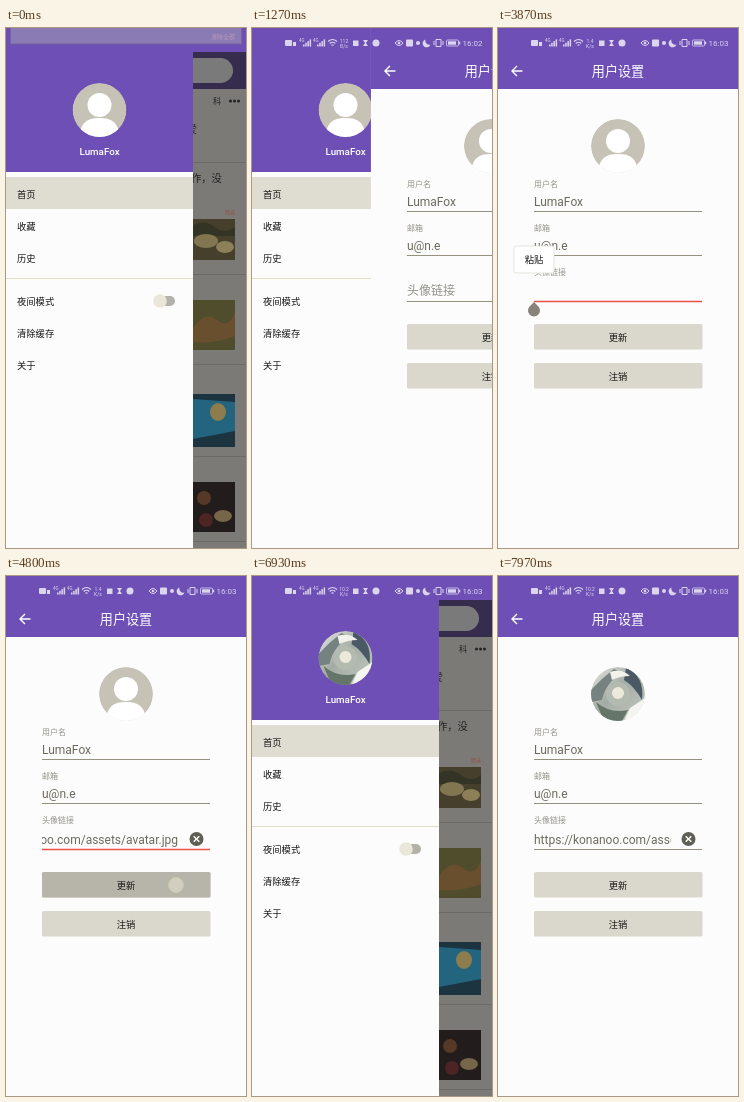
Write an HTML page that moves like this. It is 240 px wide and 520 px high and loops after 8000 ms.

```html
<!DOCTYPE html>
<html lang="zh-CN">
<head>
<meta charset="utf-8">
<style>
  html, body { margin: 0; width: 100%; height: 100%; overflow: hidden; background: #fcfcfd }
  svg { display: block; width: 240px; height: 520px }
  text { font-family: Roboto, "Noto Sans CJK SC", "Noto Sans CJK", sans-serif; dominant-baseline: central }
  .item { font-size: 9.3px; font-weight: 500; fill: #161616 }
  .label { font-size: 8px; fill: #949289 }
  .value { font-size: 12px; fill: #6c6a5e }
  .mid { text-anchor: middle }
  .bar { fill: #6e4fb5 }
  .button { fill: #dad8cc }
</style>
</head>
<body>
<svg viewBox="0 0 240 520">
  <defs>
    <clipPath id="disc"><circle r="27"/></clipPath>
    <clipPath id="field"><rect x="36" y="252" width="137" height="21"/></clipPath>
    <linearGradient id="stone" x2="1" y2="1">
      <stop offset="0" stop-color="#e6e8e4"/><stop offset=".45" stop-color="#a3aca4"/><stop offset="1" stop-color="#c3c9c0"/>
    </linearGradient>
    <g id="person" clip-path="url(#disc)">
      <circle r="27" fill="#c6c2b6"/>
      <circle cy="-5" r="12" fill="#fff"/>
      <path d="M-20 27C-19 12-12 8 0 8S19 12 20 27Z" fill="#fff"/>
    </g>
    <g id="photo" clip-path="url(#disc)">
      <circle r="27" fill="url(#stone)"/>
      <path d="M-27-4Q-16-16-4-25L4-21Q-12-12-16 6L-27 8Z" fill="#76827f"/>
      <path d="M8-26Q27-18 24 6Q16-8 6-14Z" fill="#4b5866"/>
      <path d="M-22 8Q-8 20 10 16L4 27H-14Z" fill="#66756a"/>
      <path d="M12 14L27 4V27H6Z" fill="#f4f4f0"/>
      <path d="M-8-22Q4-26 12-18Q2-18-6-14Z" fill="#f1f2ec"/>
      <circle r="12" fill="#b3bab0"/>
      <circle cy="-1" r="6" fill="#ece9da"/>
    </g>
  </defs>

  <!-- dimmed home page -->
  <rect width="240" height="520" fill="#7b7a76"/>
  <rect y="24" width="240" height="37" fill="#362d4e"/>
  <rect x="60" y="30" width="167" height="25" rx="12.5" fill="#7b7a7a"/>
  <g fill="#222">
    <text x="207" y="73" font-size="8">科</text>
    <circle cx="224.500" cy="73" r="1.500"/><circle cx="228.500" cy="73" r="1.500"/><circle cx="232.500" cy="73" r="1.500"/>
    <text x="181" y="101" font-size="10">爱</text>
    <text x="185" y="150" font-size="10.300">作，没</text>
  </g>
  <path d="M187 134.500H240M187 246.500H240M187 336.500H240M187 428.500H240M187 513.500H240" stroke="#6b6a66"/>
  <text x="219" y="184" font-size="5" fill="#94504a">精选</text>
  <g>
    <rect x="180" y="191" width="49" height="41" fill="#463f2b"/>
    <path d="M187 197q12-6 22 2t20 0v9h-42z" fill="#333426"/>
    <ellipse cx="200" cy="213" rx="12" ry="7" fill="#827651"/><ellipse cx="219" cy="219" rx="9" ry="6" fill="#8d8058"/>
    <rect x="180" y="272" width="49" height="50" fill="#4f4d2c"/>
    <path d="M187 300q12-18 24-8t18-8v24q-20 8-42 6z" fill="#6a4f2e"/>
    <rect x="180" y="366" width="49" height="53" fill="#1c3440"/>
    <path d="M187 371L229 374V403L187 411Z" fill="#23657f"/>
    <ellipse cx="212" cy="384" rx="8" ry="9" fill="#8d7c4e"/>
    <rect x="180" y="454" width="49" height="50" fill="#231c1c"/>
    <circle cx="198" cy="470" r="7" fill="#553827"/><ellipse cx="217" cy="488" rx="9" ry="6" fill="#75664a"/><circle cx="200" cy="492" r="7" fill="#4b2423"/>
  </g>

  <!-- drawer -->
  <rect width="187" height="520" fill="#fcfcfd"/>
  <rect class="bar" width="240" height="24"/>
  <rect class="bar" width="187" height="144"/>
  <use id="face" x="93.500" y="82"/>
  <g id="spinner"></g>
  <text class="mid user" x="93.500" y="123" font-size="9.800" font-weight="500" fill="#fff"></text>
  <rect y="149" width="187" height="32" fill="#dfddd2"/>
  <g id="menu"></g>
  <path d="M0 250.500H187" stroke="#e0dec4"/>
  <rect x="150" y="268" width="19" height="10" rx="5" fill="#b3b1aa"/>
  <circle cx="154" cy="273" r="6.800" fill="#ebe7d8"/>

  <!-- settings page -->
  <g id="page">
    <rect width="240" height="520" fill="#fcfcfd"/>
    <rect class="bar" width="240" height="61"/>
    <path d="M24.500 43H14M19 38L14 43L19 48" fill="none" stroke="#fff" stroke-width="1.400"/>
    <text class="mid" x="120" y="43" font-size="13.100" font-weight="500" fill="#fff">用户设置</text>
    <use id="portrait" x="120" y="118"/>
    <text class="label" x="36" y="156">用户名</text>
    <text class="value user" x="36" y="174"></text>
    <text class="label" x="36" y="200">邮箱</text>
    <text class="value" x="36" y="218">u@n.e</text>
    <path d="M36 183.500H204M36 227.500H204" stroke="#94927f"/>
    <path id="line" d="M36 273.500H204"/>
    <text id="hint" font-size="12" fill="#949289">头像链接</text>
    <g id="filled">
      <g clip-path="url(#field)"><text id="url" class="value" y="263.500">https://konanoo.com/assets/avatar.jpg</text></g>
      <circle cx="190.500" cy="263" r="7" fill="#605f55"/>
      <path d="M187.700 260.200l5.600 5.600m0-5.600l-5.600 5.600" stroke="#fff" stroke-width="1.400"/>
    </g>
    <rect class="button" x="36" y="296" width="168.500" height="25.500" rx="1.500"/>
    <rect id="pressed" x="36" y="296" width="168.500" height="25.500" rx="1.500" fill="#b7b5aa"/>
    <rect class="button" x="36" y="335" width="168.500" height="25.500" rx="1.500"/>
    <text class="item mid" x="120" y="309">更新</text>
    <text class="item mid" x="120" y="348">注销</text>
    <g id="paste">
      <path d="M36 274l4.500 4.500a6 6 0 1 1-9 0z" fill="#86847a"/>
      <rect x="16" y="218" width="40" height="27" rx="2" fill="#fff" stroke="#dddcd6" stroke-width=".8"/>
      <text class="item mid" x="36" y="231.500">粘贴</text>
    </g>
  </g>

  <circle id="touch" r="7.500" fill="#fbf7e6" fill-opacity=".4" stroke="#cfc9ae" stroke-width=".8"/>

  <!-- status bar -->
  <g id="status" fill="#fff">
    <rect x="33" y="12" width="7" height="6" rx="1"/><rect x="41" y="14" width="3" height="4"/>
    <g id="signals"></g>
    <path d="M76 13.500q4.500-4 9 0M77.700 15.500q2.800-2.500 5.600 0M79.500 17.300q1-.9 2 0" fill="none" stroke="#fff" stroke-width="1.100"/>
    <g class="mid" font-size="5"><text id="speed" x="92" y="12.500"></text><text id="unit" x="92" y="18"></text></g>
    <rect x="101" y="12.500" width="5.500" height="5.500"/>
    <path d="M111 12h5l-2 3 2 3h-5l2-3z"/>
    <circle cx="124" cy="15" r="3.500"/>
    <path d="M143 15q4-5 8 0q-4 5-8 0z" fill="none" stroke="#fff"/><circle cx="147" cy="15" r="1.300"/>
    <rect x="154" y="11.500" width="7" height="7" rx="1"/>
    <circle cx="166" cy="15" r="2"/>
    <path d="M173.500 11.500a4 4 0 1 0 5 5a4 4 0 0 1-5-5z"/>
    <path d="M184 11.500h5v7h-5zM182 13v4M191 13v4" fill="none" stroke="#fff"/>
    <rect x="194.500" y="12" width="12" height="6" rx="1" fill="none" stroke="#fff" stroke-width=".8"/>
    <rect x="196" y="13.300" width="8" height="3.400"/><rect x="207" y="13.700" width="1.200" height="2.600"/>
    <text id="clock" x="210.500" y="15" font-size="8"></text>
  </g>
  <g id="shade">
    <rect x="4.500" y="-2" width="231" height="18" fill="#8b7bb4" stroke="#75649f"/>
    <text x="205" y="8" font-size="6" fill="#b79cb4">清除全部</text>
  </g>
</svg>
<script>
const $ = id => document.getElementById(id);
const set = (id, attrs) => { for (const k in attrs) $(id).setAttribute(k, attrs[k]); };
const show = (id, on) => set(id, { visibility: on ? 'visible' : 'hidden' });
const ramp = (t, a, b) => Math.min(1, Math.max(0, (t - a) / (b - a)));
const ease = x => x * x * (3 - 2 * x);
const LOOP = 8000;

document.querySelectorAll('.user').forEach(e => e.textContent = 'LumaFox');
$('menu').innerHTML = [['首页', 166], ['收藏', 198], ['历史', 230], ['夜间模式', 273], ['清除缓存', 305], ['关于', 337]]
  .map(([s, y]) => `<text class="item" x="11" y="${y}">${s}</text>`).join('');
$('signals').innerHTML = [47, 61].map(x => `<text x="${x}" y="12.500" font-size="4.500">4G</text>` +
  [0, 1, 2, 3].map(i => `<rect x="${x + 4 + i * 2.2}" y="${16.5 - i * 1.7}" width="1.500" height="${2 + i * 1.7}"/>`).join('')).join('');
$('spinner').innerHTML = Array.from({ length: 12 }, (_, i) =>
  `<path d="M0-4.500V-8" transform="rotate(${i * 30})" stroke="#fff" stroke-width="1.400" stroke-linecap="round" opacity="${.35 + i / 25}"/>`).join('');

// start, end, x, y
const touches = [
  [640, 840, 93, 82], [1700, 2850, 86.500, 273], [3870, 4020, 36, 232],
  [4650, 4860, 170, 309], [6960, 7150, 93, 82]
];

function draw(t) {
  const editing = t >= 1800 && t < 5200;
  const slide = 1 - ease(ramp(t, 1100, 1440)) + ease(ramp(t, 4840, 5160)) - ease(ramp(t, 7370, 7700));
  set('page', { transform: `translate(${240 * slide})` });

  const loaded = t >= 5430;
  const picture = { href: loaded ? '#photo' : '#person' };
  set('face', picture);
  set('portrait', picture);
  show('face', t < 4800 || loaded);
  show('spinner', t >= 4800 && !loaded);
  set('spinner', { transform: `translate(93.500 82) rotate(${Math.floor(t / 83) * 30})` });

  const lift = ease(ramp(t, 2800, 3000));
  set('hint', { transform: `translate(36 ${263 - 19 * lift}) scale(${1 - lift / 3})` });
  set('line', { stroke: editing ? '#ee4f45' : '#94927f', 'stroke-width': editing ? 1.4 : 1 });
  show('filled', t >= 3950);
  set('url', { x: editing ? 172 : 36, 'text-anchor': editing ? 'end' : 'start' });
  show('pressed', t >= 4670 && t < 4900);
  set('paste', { opacity: ramp(t, 3050, 3250) - ramp(t, 3950, 4100) });

  const tap = touches.find(([a, b]) => t >= a && t < b);
  show('touch', tap);
  if (tap) set('touch', { cx: tap[2], cy: tap[3], opacity: ramp(t, tap[0], tap[0] + 60) });

  const [speed, unit] = t < 3000 ? ['112', 'B/s'] : t < 5570 ? ['1.4', 'K/s'] : ['10.2', 'K/s'];
  $('speed').textContent = speed;
  $('unit').textContent = unit;
  $('clock').textContent = t < 2500 ? '16:02' : '16:03';
  set('status', { opacity: .76 * ramp(t, 100, 400) });
  set('shade', { transform: `translate(0 ${-18 * ramp(t, 30, 230)})` });
}

const start = performance.now();
function tick() {
  draw((performance.now() - start) % LOOP);
  requestAnimationFrame(tick);
}
tick();
</script>
</body>
</html>
```
